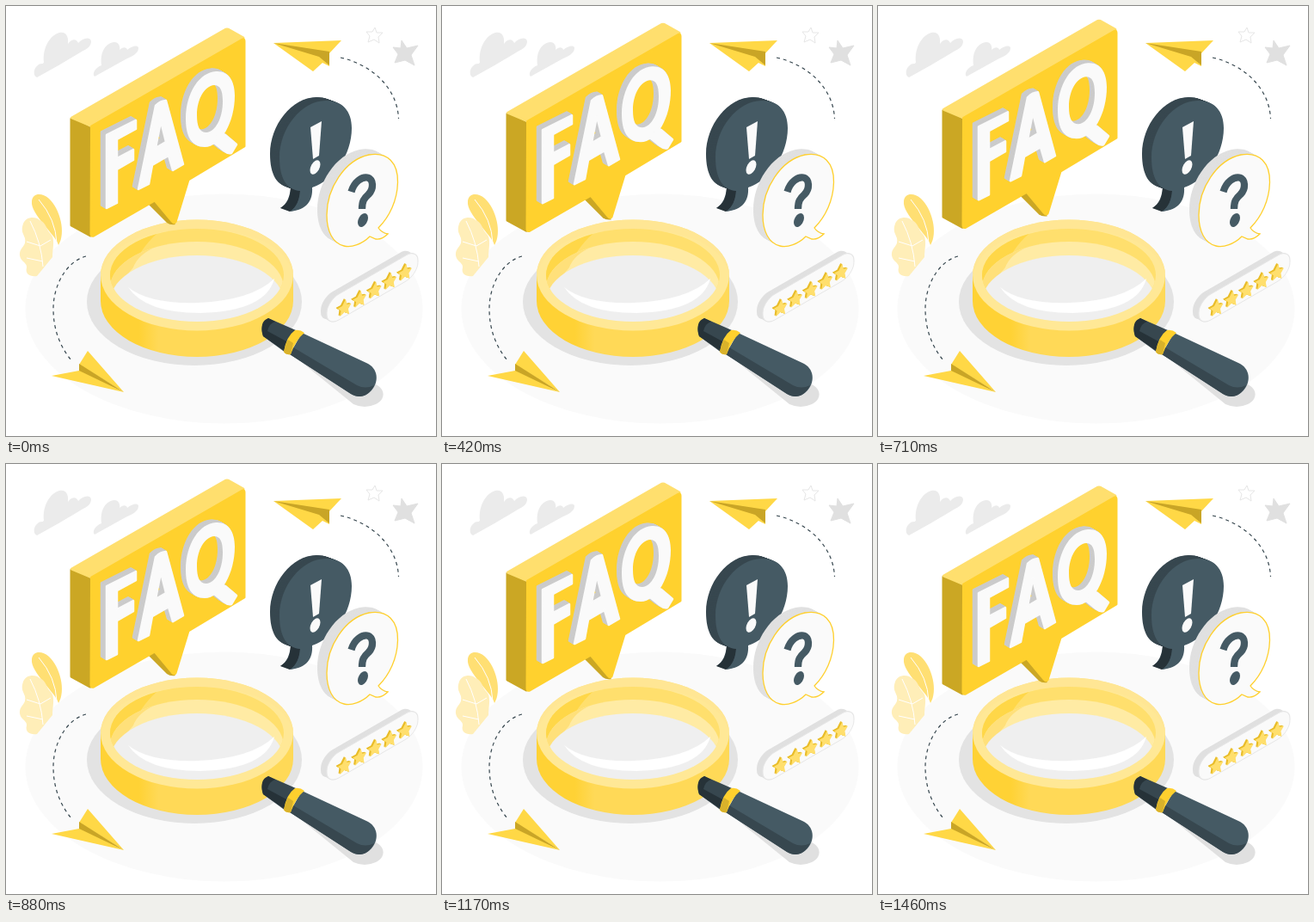
Write an HTML page that moves like this. It is 500x500 px and loops after 1500 ms.

```html
<!DOCTYPE html>
<html lang="en">
<head>
<meta charset="utf-8">
<title>FAQ</title>
<style>
  html, body { margin: 0; height: 100%; overflow: hidden; background: #fff; }
  svg { display: block; width: 100%; height: 100%; }
  .round { stroke-linejoin: round; stroke-width: 3; }
</style>
</head>
<body>
<svg viewBox="0 0 500 500" fill="none">
  <defs>
    <linearGradient id="ring">
      <stop offset=".2" stop-color="#ffd235"/><stop offset=".3" stop-color="#ffd957"/>
    </linearGradient>
    <clipPath id="opening"><ellipse cx="222" cy="313" rx="101" ry="54"/></clipPath>
    <g id="letters" stroke-linejoin="round" stroke-width="2.500" fill-rule="evenodd">
      <path d="M117 150L151 133V143L129 155V177L148 167V179L129 190V229L117 235Z"/>
      <path d="M174 116Q180 110 186 110L206 184L194 191L189 174L170 185L166 207L154 213ZM180 134L174 165L186 158Z"/>
      <path stroke="none" d="M209 131C209 101 225 77 244 76C258 75 266 86 266 104C266 135 250 164 231 164C216 164 209 152 209 131ZM222 127C222 108 231 93 242 92C249 92 252 98 252 111C252 130 244 146 233 147C225 147 222 140 222 127Z"/>
      <path d="M247 147L255 150L268 161L262 171Q258 172 253 168L242 159Z"/>
    </g>
    <path id="star" d="M1.500-10L3-4L8-5L4.500 1L5.500 7L0 5L-5 10L-4 3.500L-8 1L-2.500-2Z"/>
    <path id="exclaim" d="M318 176C318 143 343 110 372 110C391 110 402 122 402 142C402 173 381 203 356 211C357 226 350 237 330 239C338 234 341 226 342 215C326 214 318 200 318 176Z"/>
    <path id="question" d="M433 258Q437 264 444 265Q437 272 430 271L423 268C414 277 402 281 393 279C380 276 373 262 373 243C373 212 394 179 422 173C444 169 456 183 455.500 205C455 226 446 245 433 258Z"/>
  </defs>

  <ellipse cx="253.500" cy="352" rx="231" ry="133.500" fill="#fafafa"/>

  <g fill="#ebebeb">
    <path d="M36 83C31 81 32 72 37 69C40 66 42 68 44 66C42 49 51 34 62 31C70 29 73 36 72 44C78 36 83 40 84 43C89 37 98 35 99 41C99 47 94 50 88 53Q62 69 36 83Z"/>
    <path d="M103 82C100 79 103 72 111 69C109 53 116 43 126 42C131 42 133 47 132 51C137 47 140 48 141 51C147 46 154 45 154 49C154 55 146 59 139 62Z"/>
  </g>
  <path d="M460 40L466 49L479 46L471 57L475 69L464 63L452 66L456 56L450 48L459 49Z" fill="#e0e0e0" stroke="#e0e0e0" stroke-linejoin="round"/>
  <path d="M429 25L431 31L438 31L433 36L434 43L428 39L421 42L423 35L419 30L426 30Z" stroke="#e6e6e6"/>

  <g stroke="#37474f" stroke-width="1.200" stroke-dasharray="4 4">
    <path d="M389 60C425 68 455 95 456.500 131"/>
    <path d="M93 291C70 297 55 325 55 352C55 375 62 395 76 412"/>
  </g>
  <path d="M311 43L390 40L376 55Z" fill="#ffd846"/>
  <path d="M311 43L376 53V70L368 66L357 76Z" fill="#ffd846"/>
  <path d="M311 43L376 53V69L364 59Z" fill="#c9a526"/>
  <path d="M95 401L137 449L85 417Z" fill="#ffd846"/>
  <path d="M85 416L137 449L85 426Z" fill="#c9a526"/>
  <path d="M53 430L85 424L137 449Z" fill="#ffd846"/>

  <path d="M61 278C58 266 28 242 30 227C31 217 42 217 50 224C63 236 70 264 61 278Z" fill="#ffdf73"/>
  <path d="M38 225Q58 248 59 276" stroke="#fff"/>
  <path d="M36 314C28 315 22 312 24 304C25 298 15 297 16 287C17 280 24 279 22 270C20 264 17 262 20 253C24 244 35 245 39 249C47 252 47 260 51 264C58 270 54 281 54 292Z" fill="#ffeeb8"/>
  <path d="M28 250Q41 275 43 303M24 274L40 279L52 272M24 293L43 297" stroke="#fff"/>

  <!-- magnifier -->
  <ellipse cx="219" cy="344" rx="125" ry="74" fill="#e3e3e3"/>
  <path d="M325 399L344 391L430 440C442 446 441 458 430 463Q417 469 404 463Z" fill="#e0e0e0"/>
  <path d="M110 313V343A112 65 0 0 0 334 343V313Z" fill="url(#ring)"/>
  <ellipse cx="222" cy="313" rx="112" ry="64.500" fill="#ffe896"/>
  <path d="M110 313A112 64.500 0 0 1 334 313Q322 262 222 259Q122 262 110 313Z" fill="#ffe694"/>
  <g clip-path="url(#opening)">
    <path d="M100 240H340V380H100Z" fill="#ffdf6d"/>
    <path d="M115 250H195Q160 272 148 304L125 332H115Z" fill="#ffd748"/>
    <ellipse cx="222" cy="328" rx="101" ry="54" fill="#ffeba4"/>
    <path d="M121 328A101 54 0 0 1 172 281Q153 290 148 304L125 332Z" fill="#ffe07a"/>
    <ellipse cx="222" cy="344" rx="101" ry="54" fill="#efefef"/>
    <path d="M142 327Q167 347 224 345Q286 342 312 317Q302 355 226 357Q162 357 142 327Z" fill="#fff"/>
  </g>
  <path d="M305 363L337 377L325 403L299 384Q294 371 305 363Z" fill="#37474f"/>
  <path d="M305 363Q294 367 299 384L324 401L328 391L304 378Q306 369 313 367Z" fill="#263238"/>
  <path d="M344 380L419 415C433 421 434 437 425 447C418 455 409 456 401 451L330 405Z" fill="#455a64"/>
  <path d="M330 405L334 397L408 441Q418 446 428 441C422 454 411 457 401 451Z" fill="#37474f"/>
  <path d="M336 377Q342 376 347 380Q337 388 331 405Q326 406 323 402Q326 384 336 377Z" fill="#ffd02e"/>
  <path d="M323 402Q325 393 328 388L334 392L331 405Q326 406 323 402Z" fill="#d9b22b"/>

  <!-- speech bubbles -->
  <g id="exclaimDepth" fill="#37474f"></g>
  <path d="M319 235C327 230 331 224 331 211L342 215C341 226 338 234 330 239Z" fill="#263238"/>
  <use href="#exclaim" fill="#455a64"/>
  <path d="M354 141L367 134L364 174L357 178Z" fill="#fafafa"/>
  <ellipse transform="translate(359.500 187.500) skewY(-30)" rx="6" ry="7.500" fill="#fafafa"/>

  <g id="questionDepth" fill="#e0e0e0"></g>
  <use href="#question" fill="#fafafa" stroke="#ffd02e" stroke-width="1.300"/>
  <path d="M401.500 216C405 204 414 198.500 420 199.500C428 201 427.500 213 421.500 219C416 224 414 227 414 236" stroke="#455a64" stroke-width="8.300"/>
  <ellipse transform="translate(415 249) skewY(-25)" rx="6" ry="7.500" fill="#455a64"/>

  <!-- rating -->
  <g id="rating">
    <g transform="translate(366 340) skewY(-30)" fill="#e0e0e0">
      <rect width="106" height="30" rx="14"/><rect x="4" y="4" width="106" height="30" rx="14"/>
    </g>
    <rect transform="translate(373 343) skewY(-30)" width="106" height="30" rx="14" fill="#fafafa" stroke="#e6e6e6"/>
  </g>

  <!-- FAQ sign -->
  <g id="sign">
    <path class="round" d="M76 131L98 142V267L76 255Z" fill="#cba724" stroke="#cba724"/>
    <path class="round" d="M76.500 130L254 28Q257 26 260 28L276 37L98 139Z" fill="#ffdf6e" stroke="#ffdf6e"/>
    <path d="M166 231L173 226L197 254Q191 255 187 252Z" fill="#cba724"/>
    <path class="round" d="M99.500 140L275 39Q277 38 277 41V163L212 202L197 251Q195 253 193 250L173 226L102 267Q99 268 99 265Z" fill="#ffd12e" stroke="#ffd12e"/>
    <g id="lettersDepth" fill="#cbcbcb" stroke="#cbcbcb"></g>
    <use href="#letters" fill="#fafafa" stroke="#fafafa"/>
  </g>
</svg>
<script>
  const $ = id => document.getElementById(id);
  function addUse(parent, id, x, y, fill) {
    const use = document.createElementNS('http://www.w3.org/2000/svg', 'use');
    use.setAttribute('href', '#' + id);
    use.setAttribute('transform', `translate(${x} ${y})`);
    if (fill) use.setAttribute('fill', fill);
    parent.append(use);
  }
  // Sweep a shape backwards to give it thickness.
  function extrude(id, dx, dy) {
    for (let i = 12; i > 0; i--) addUse($(id + 'Depth'), id, dx * i / 12, dy * i / 12);
  }

  extrude('exclaim', -11, -4);
  extrude('question', -11, -6);
  extrude('letters', -6, -3.6);
  for (let i = 0; i < 5; i++) {
    const x = 393.5 + i * 17.6, y = 351 - i * 10.3;
    for (let d = 2; d > 0; d -= 0.5) addUse($('rating'), 'star', x - d, y - d / 2, '#e9bd2a');
    addUse($('rating'), 'star', x, y, '#ffdf6d');
  }

  const LOOP = 1500, HALF = 730, RISE = 10;
  function draw(now) {
    const t = now % LOOP;
    const lift = RISE * Math.max(0, 1 - Math.abs(t - HALF) / HALF);
    $('sign').setAttribute('transform', `translate(0 ${-lift})`);
    requestAnimationFrame(draw);
  }
  draw(0);
</script>
</body>
</html>
```
